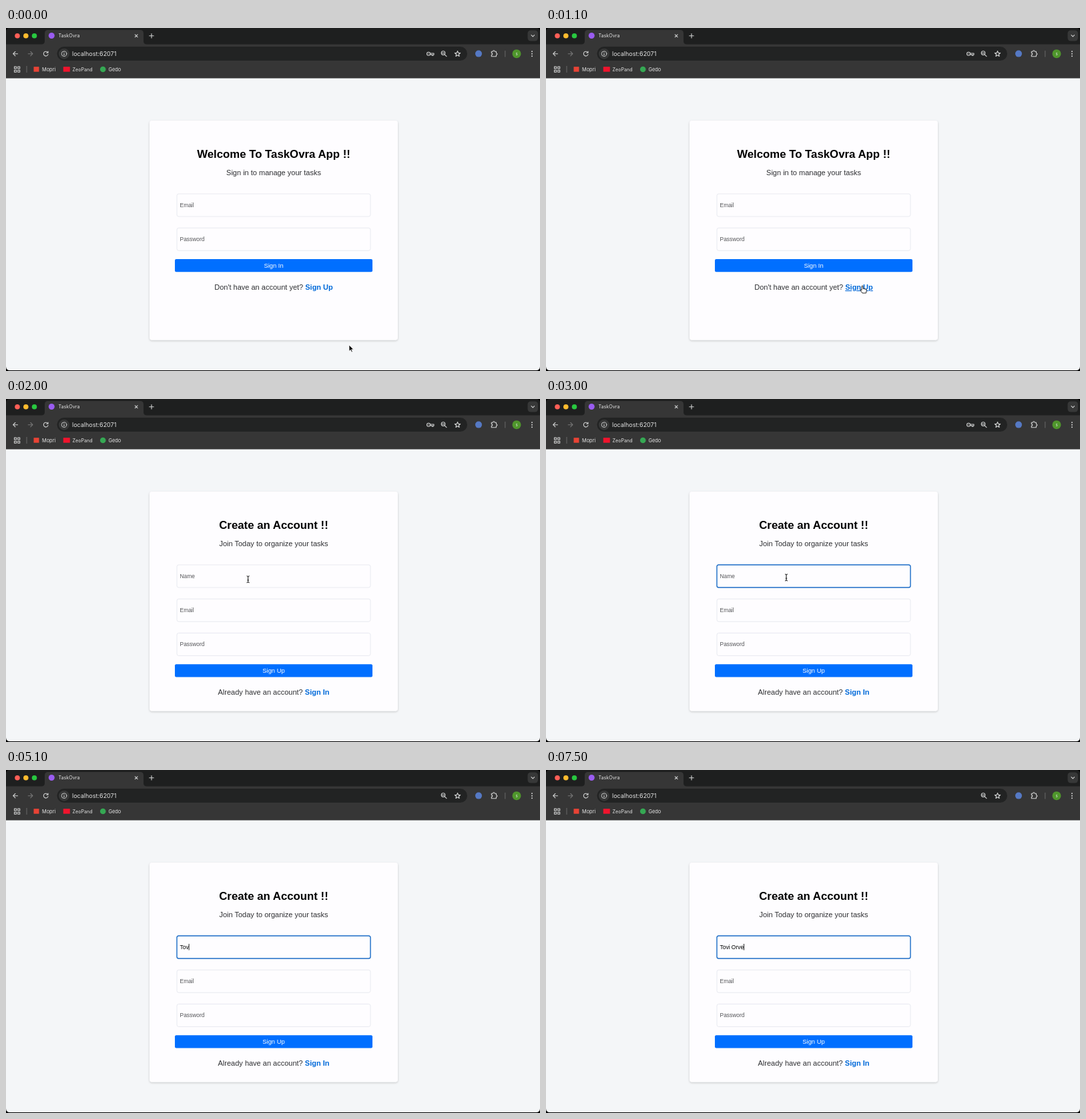
Recreate the animation shown at these times as an HTML page. Size 800 px wide and 515 px high, loop 8000 ms.

```html
<!DOCTYPE html>
<html lang="en">
<head>
<meta charset="utf-8">
<title>TaskOvra</title>
<style>
  html, body { margin: 0; width: 100%; height: 100%; overflow: hidden; background: #000; }
  svg { display: block; width: 800px; height: 515px; }
  text { font-family: "Liberation Sans", Arial, sans-serif; white-space: pre; }
  .ui { font-family: Inter, Roboto, sans-serif; fill: #e3e3e3; }
  .line { fill: none; stroke: #d0d1d1; stroke-width: 1.1; stroke-linecap: round; stroke-linejoin: round; }
  .mid { text-anchor: middle; }
  .title { font-size: 16.8px; font-weight: 700; fill: #000; }
  .body { font-size: 11px; fill: #2f3033; }
  .link { font-weight: 700; fill: #0069d9; }
  .button { font-size: 9.4px; fill: #fff; }
  .input { font-size: 8.45px; }
  .hint { fill: #56575a; }
</style>
</head>
<body>
<svg viewBox="0 0 800 515" xmlns="http://www.w3.org/2000/svg">
  <defs>
    <filter id="shadow" x="-10%" y="-10%" width="120%" height="120%">
      <feDropShadow dx="0" dy="1.2" stdDeviation="1.8" flood-color="#000" flood-opacity=".2"/>
    </filter>
  </defs>

  <!-- browser frame -->
  <rect width="800" height="515" fill="#000"/>
  <rect width="800" height="60" rx="5" fill="#1e1f1f"/>
  <path d="M53 24.5q5 0 5-5V8q0-5 5-5H201q5 0 5 5V19.500q0 5 5 5H800V76H0V24.500z" fill="#363636"/>
  <path d="M0 75.500H800V508q0 6-6 6H6q-6 0-6-6z" fill="#f4f6f8"/>

  <circle cx="17" cy="11.7" r="3.8" fill="#ff5f57"/>
  <circle cx="29.800" cy="11.700" r="3.8" fill="#febc2e"/>
  <circle cx="42.500" cy="11.700" r="3.8" fill="#28c840"/>
  <circle cx="68.300" cy="11.500" r="4.500" fill="#9a5cf0"/>
  <text class="ui" x="78.500" y="14.200" font-size="7.150">TaskOvra</text>
  <rect x="781.500" y="3.500" width="15.500" height="16" rx="4.500" fill="#373838"/>
  <g class="line">
    <path d="M193.300 9.800l3.800 3.800m0-3.800l-3.800 3.800"/>
    <path d="M214.800 11.700h6.400m-3.200-3.200v6.400"/>
    <path d="M787 10.600l2.300 2.300 2.300-2.300"/>
    <path d="M17.500 38.700h-6.800m3.200-3.200l-3.200 3.200 3.200 3.200"/>
    <path d="M33.200 38.700h6.800m-3.200-3.200l3.200 3.200-3.200 3.200" stroke="#777" style="stroke:#777"/>
    <path d="M62.700 37a3.400 3.400 0 1 0 .3 2.600M63 35v2.300h-2.300"/>
  </g>

  <rect x="76.500" y="28" width="614.500" height="21" rx="10.500" fill="#222323"/>
  <circle cx="87" cy="38.700" r="8" fill="#363737"/>
  <g class="line">
    <circle cx="87" cy="38.700" r="3.800" stroke-width=".9"/>
    <path d="M87 38.500v2M87 36.700v.1"/>
  </g>
  <text class="ui" x="99" y="41.900" font-size="9">localhost:62071</text>

  <g id="key" class="line">
    <circle cx="633" cy="38.800" r="2.500"/>
    <path d="M635.500 38h5.500v1.900h-1v1.300h-1.700v-1.300h-2.800"/>
    <path d="M632.700 38.800h.5"/>
  </g>
  <g class="line">
    <circle cx="655" cy="37.600" r="2.800"/>
    <path d="M657.200 39.800l2.800 2.800M653.800 37.600h2.400"/>
    <path id="star"/>
    <path d="M727.300 35.200h2.200q0-1.500 1.300-1.500t1.300 1.500h2.300v2.500q1.500 0 1.500 1.300t-1.500 1.300v2.400h-7.100v-2.300q1.500-.1 1.500-1.400t-1.500-1.400z"/>
  </g>
  <circle cx="708" cy="38.600" r="5" fill="#5579c4"/>
  <path d="M747.800 34v9.500" stroke="#686868"/>
  <circle cx="765" cy="38.700" r="6.500" fill="#4f962c"/>
  <text class="ui mid" x="765" y="40.800" font-size="6">s</text>
  <g fill="#d0d1d1">
    <circle cx="788" cy="35.200" r="1"/><circle cx="788" cy="38.700" r="1"/><circle cx="788" cy="42.200" r="1"/>
  </g>

  <!-- bookmarks -->
  <g class="line" stroke-width=".9">
    <path d="M12.500 58h3v3h-3zM17.700 58h3v3h-3zM12.500 63.200h3v3h-3zM17.700 63.200h3v3h-3z"/>
  </g>
  <path d="M31 57v10" stroke="#686868"/>
  <rect x="41.500" y="58.200" width="8" height="7.500" fill="#e94335"/>
  <rect x="85.800" y="58.200" width="10" height="7.500" fill="#f0142d"/>
  <circle cx="145.200" cy="62" r="4.300" fill="#35a853"/>
  <g font-size="7.400">
    <text class="ui" x="54" y="64.700">Mopri</text>
    <text class="ui" x="99.500" y="64.700" font-size="7.150">ZeoPand</text>
    <text class="ui" x="153.500" y="64.700">Gedo</text>
  </g>

  <rect x="215" y="139" width="372" height="329.500" rx="4" fill="#fefdff" filter="url(#shadow)"/>
  <g id="signIn"></g>
  <g id="signUp"></g>
  <g id="focus">
    <rect x="256" y="249" width="290" height="34" rx="2.800" fill="none" stroke="#1f6fc9" stroke-width="1.400"/>
    <text id="typed" class="input" x="260.500" y="268.900" fill="#000"></text>
    <rect id="caret" y="261" width=".9" height="9.500" fill="#111"/>
  </g>
  <g id="pointer">
    <path id="arrow" d="M0 0V9.300L2.200 7.300 3.700 10.600 5.200 9.900 3.700 6.700H6.600Z" fill="#000" stroke="#fff" stroke-width=".7"/>
    <path id="hand" d="M-1 1Q-1 0 0 0Q1 0 1 1V4.300L5 5.100Q6.400 5.500 6.200 6.800L5.500 11H0L-3 7Q-3.500 5.700-2.200 5.900L-1 6.800Z"
          fill="#fff" stroke="#111" stroke-width=".9" stroke-linejoin="round"/>
    <path id="beam" d="M-2-5Q0-5 0-3.800Q0-5 2-5M0-4V4M-2 5Q0 5 0 3.800Q0 5 2 5M-1.200 1.200H1.200" fill="none" stroke="#111" stroke-width="1"/>
  </g>
</svg>
<script>
const $ = id => document.getElementById(id);
const show = (id, on) => { $(id).style.display = on ? '' : 'none'; };

const LOOP = 8000, STEP = 100;
const FIELD = { x: 256, y: 249, w: 290, h: 34, pitch: 51.2 };
const LINK = { x: 448, y: 383, w: 42, h: 13 };
const PAGE_SWAP = 1200, FOCUS = 2100, KEY_HIDDEN = 4300;
const NAME = 'Tovi Orve';
const KEY_TIMES = [4100, 4900, 5100, 5200, 6100, 6600, 7000, 7300, 7500];

const label = (cls, x, y, content) => `<text class="${cls}" x="${x}" y="${y}">${content}</text>`;

function form(title, subtitle, hints, button, question, link, linkId) {
  const fields = hints.map((hint, i) => {
    const y = FIELD.y + i * FIELD.pitch;
    return `<rect x="${FIELD.x}" y="${y}" width="${FIELD.w}" height="${FIELD.h}" rx="2.8"
      fill="none" stroke="#e2e5ec" stroke-width=".8"/>` +
      label('input hint', 260.5, y + 19.9, hint).replace('<text', `<text id="${linkId}Hint${i}"`);
  }).join('');
  const bottom = FIELD.y + hints.length * FIELD.pitch;
  return label('title mid', 401, 194.800, title) +
    label('body mid', 401, 221, subtitle) + fields +
    `<rect x="253" y="${bottom - 4.4}" width="296" height="19.2" rx="2" fill="#006fff"/>` +
    label('button mid', 401, bottom + 8.7, button) +
    label('body mid', 401, bottom + 41.6, `${question} <tspan id="${linkId}" class="link">${link}</tspan>`);
}

$('signIn').innerHTML = form('Welcome To TaskOvra App !!', 'Sign in to manage your tasks',
  ['Email', 'Password'], 'Sign In', "Don't have an account yet?", 'Sign Up', 'toSignUp');
$('signUp').innerHTML = form('Create an Account !!', 'Join Today to organize your tasks',
  ['Name', 'Email', 'Password'], 'Sign Up', 'Already have an account?', 'Sign In', 'toSignIn');

$('star').setAttribute('d', 'M' + Array.from({ length: 10 }, (_, i) => {
  const r = i % 2 ? 1.9 : 4.4, a = i * Math.PI / 5 - Math.PI / 2;
  return `${(676.5 + r * Math.cos(a)).toFixed(2)} ${(38.9 + r * Math.sin(a)).toFixed(2)}`;
}).join('L') + 'Z');

const progress = (t, from, to) => {
  const p = Math.min(1, Math.max(0, (t - from) / (to - from)));
  return p * p * (3 - 2 * p);
};
const mix = (a, b, p) => a + (b - a) * p;
const inside = (x, y, box) => x >= box.x && x <= box.x + box.w && y >= box.y && y <= box.y + box.h;

function pointerAt(t) {
  const a = progress(t, 100, 1000), b = progress(t, 1500, 2050);
  return [mix(mix(514, 474, a), 360, b), mix(mix(476, 387, a), 268, b)];
}

function render(now) {
  const t = Math.floor(now % LOOP / STEP) * STEP;
  const registering = t >= PAGE_SWAP;
  const [x, y] = pointerAt(t);
  const overLink = !registering && inside(x, y, LINK);
  const overField = registering &&
    [0, 1, 2].some(i => inside(x, y, { ...FIELD, y: FIELD.y + i * FIELD.pitch }));

  show('signIn', !registering);
  show('signUp', registering);
  show('key', t < KEY_HIDDEN);
  $('toSignUp').style.textDecoration = overLink ? 'underline' : 'none';

  show('pointer', t < KEY_TIMES[0]);
  show('arrow', !overLink && !overField);
  show('hand', overLink);
  show('beam', overField);
  $('pointer').setAttribute('transform', `translate(${x} ${y})`);

  const count = KEY_TIMES.filter(k => k <= t).length;
  const lastInput = count ? KEY_TIMES[count - 1] : FOCUS;
  show('focus', t >= FOCUS);
  show('toSignInHint0', count === 0);
  $('typed').textContent = NAME.slice(0, count);
  const width = count && t >= FOCUS ? $('typed').getComputedTextLength() : 0;
  $('caret').setAttribute('x', 260.5 + width);
  show('caret', (t - lastInput) % 1000 < 500);
}

let start;
function tick(now) {
  start ??= now;
  render(now - start);
  requestAnimationFrame(tick);
}
render(0);
requestAnimationFrame(tick);
</script>
</body>
</html>
```
